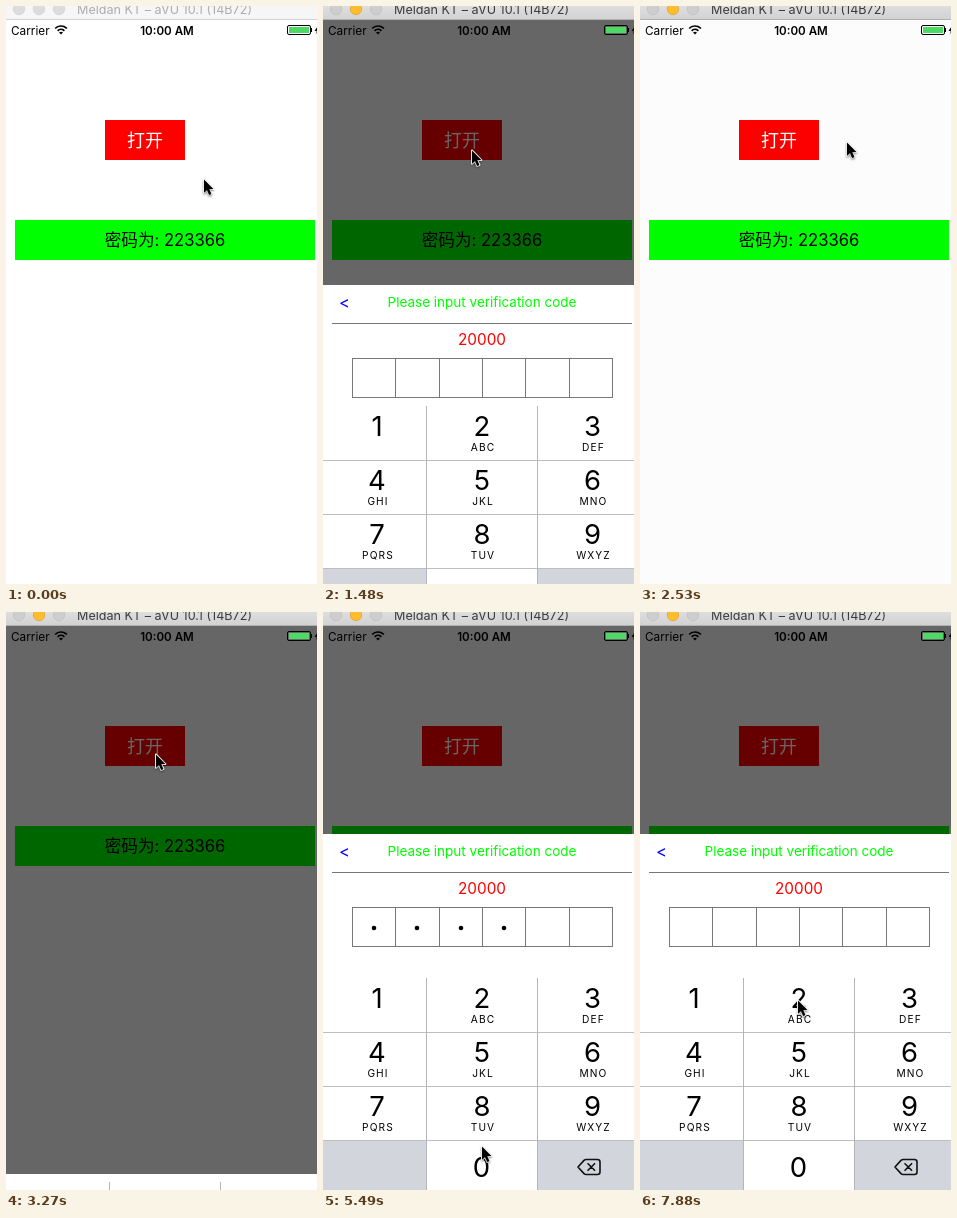
An HTML page with a canvas for the animation above (8000 ms loop, 311 px wide and 578 px high).

```html
<!DOCTYPE html>
<html lang="en">
<head>
<meta charset="utf-8">
<title>Verification code sheet</title>
<style>
  html, body { margin: 0; width: 311px; height: 578px; overflow: hidden; background: #fff; }
  canvas { display: block; }
</style>
</head>
<body>
<canvas id="stage" width="311" height="578"></canvas>
<script>
const ctx = document.getElementById('stage').getContext('2d');
const LOOP = 8000, TICK = 148.5;   // the screen refreshes once per tick
const FONT = "Inter, 'Noto Sans CJK SC', 'Noto Sans CJK', sans-serif";
const KEYS = ['', 'ABC', 'DEF', 'GHI', 'JKL', 'MNO', 'PQRS', 'TUV', 'WXYZ'];
const COLS = [0, 104, 215, 326], CENTERS = [54, 159, 269.5], ROW = 54;
const KEY_GREY = '#d2d5db';

// Pointer path: tick, x, y
const POINTER = [
  [1, 197, 172], [3, 178, 160], [5, 151, 145], [7, 148, 143], [10, 148, 143],
  [13, 206, 135], [18, 206, 135], [21, 149, 141], [23, 149, 141], [26, 143, 425],
  [28, 145, 443], [31, 147, 446], [32, 147, 446], [34, 151, 497], [36, 150, 505],
  [37, 158, 533], [38, 175, 519], [39, 175, 519], [41, 237, 499], [45, 235, 497],
  [48, 235, 497], [52, 159, 390], [53, 157, 387]
];
// Key presses: tick of press, key number
const PRESSES = [[29, 5], [30, 5], [34, 8], [36, 8], [41, 9], [43, 9]];

function rect(x, y, w, h, color) {
  ctx.fillStyle = color;
  ctx.fillRect(x, y, w, h);
}

function text(str, x, y, size, color, { weight = 400, align = 'center', spacing = 0 } = {}) {
  ctx.font = `${weight} ${size}px ${FONT}`;
  ctx.letterSpacing = spacing + 'px';
  ctx.textAlign = align;
  ctx.fillStyle = color;
  ctx.fillText(str, x, y);
}

function shape(path, x, y, { fill, stroke, width = 1 }) {
  ctx.save();
  ctx.translate(x, y);
  const p = new Path2D(path);
  ctx.lineWidth = width;
  ctx.lineJoin = ctx.lineCap = 'round';
  if (stroke) { ctx.strokeStyle = stroke; ctx.stroke(p); }
  if (fill) { ctx.fillStyle = fill; ctx.fill(p); }
  ctx.restore();
}

function titleBar(active) {
  const g = ctx.createLinearGradient(0, 0, 0, 13);
  g.addColorStop(0, active ? '#dedede' : '#f6f6f6');
  g.addColorStop(1, active ? '#d2d2d2' : '#f6f6f6');
  rect(0, 0, 311, 13, g);
  rect(0, 13, 311, 1, active ? '#b0b0b0' : '#d3d3d3');
  [13, 33, 53].forEach((x, i) => {
    const lit = active && i === 1;
    ctx.beginPath();
    ctx.arc(x, 3, 5.7, 0, 7);
    ctx.fillStyle = lit ? '#ffbd2e' : active ? '#cecece' : '#dcdcdc';
    ctx.strokeStyle = lit ? '#e0a028' : active ? '#bcbcbc' : '#d0d0d0';
    ctx.lineWidth = 0.7;
    ctx.fill();
    ctx.stroke();
  });
  text('Meldan KT – aVU 10.1 (14B72)', 158.5, 8, 12.6, active ? '#3c3c3c' : '#adadad');
}

function statusBar() {
  text('Carrier', 5, 28.5, 11.8, '#000', { align: 'left' });
  text('10:00 AM', 161, 28.5, 11.6, '#000', { weight: 600 });
  ctx.strokeStyle = '#000';
  ctx.lineWidth = 1.7;
  [4.6, 8].forEach(r => {
    ctx.beginPath();
    ctx.arc(55, 28, r, -Math.PI * 0.76, -Math.PI * 0.24);
    ctx.stroke();
  });
  shape('M0 0L-2 -2Q0 -3.6 2 -2Z', 55, 28.5, { fill: '#000' });
  ctx.lineWidth = 1;
  ctx.beginPath();
  ctx.roundRect(281.5, 19.5, 23, 9, 1.5);
  ctx.stroke();
  rect(283, 21, 20, 6, '#4cd964');
  rect(305, 22, 1, 4, '#000');
  shape('M4 -5L0 1H3L1 5Z', 308.5, 24, { fill: '#000' });
}

function page(dim) {
  rect(0, 14, 311, 564, '#fff');
  rect(99, 114, 80, 40, '#f00');
  text('打开', 139, 140.5, 18, '#fff');
  rect(9, 214, 300, 40, '#0f0');
  text('密码为: 223366', 159, 240, 16.6, '#000');
  rect(0, 14, 311, 564, `rgba(0,0,0,${dim})`);
}

function keyboard(top, pressed) {
  rect(0, top, 311, 216, '#fff');
  rect(0, top + 3 * ROW, 103, ROW, KEY_GREY);
  rect(215, top + 3 * ROW, 96, ROW, KEY_GREY);
  KEYS.forEach((letters, i) => {
    const col = i % 3, y = top + Math.floor(i / 3) * ROW;
    if (pressed === i + 1) rect(COLS[col], y, COLS[col + 1] - COLS[col] - 1, ROW, KEY_GREY);
    text(i + 1, CENTERS[col], y + 30, 27.5, '#000');
    text(letters, CENTERS[col] + 1, y + 45, 10.2, '#000', { spacing: 1.1 });
  });
  text('0', 158.5, top + 199, 27.5, '#000');
  [1, 2, 3].forEach(r => rect(0, top + r * ROW, 311, 1, '#bcbec2'));
  [103, 214].forEach(x => rect(x, top, 1, 216, '#b3b5b9'));
  shape('M-11 0L-5 -6.6Q-4 -7.5 -3 -7.5H8.5Q11 -7.5 11 -5V5Q11 7.5 8.5 7.5H-3Q-4 7.5 -5 6.6Z' +
    'M-1 -3.3L5.6 3.3M5.6 -3.3L-1 3.3', 266, top + 189, { stroke: '#111', width: 1.6 });
}

function sheet(hidden, dots, shift, pressed) {
  const y = Math.round(222 + 360 * hidden);
  rect(0, y, 311, 360, '#fff');
  text('<', 16, y + 22.5, 16.4, '#00f', { align: 'left' });
  text('Please input verification code', 159, y + 22, 13.5, '#0f0');
  rect(9, y + 38, 300, 1, '#777');
  text('20000', 159, y + 60, 15.3, '#f00');
  const x = i => Math.floor(29.4 + shift + i * 260 / 6);
  for (let i = 0; i < 7; i++) rect(x(i), y + 73, 1, 40, '#777');
  rect(x(0), y + 73, 260, 1, '#777');
  rect(x(0), y + 112, 260, 1, '#777');
  for (let i = 0; i < dots; i++) {
    ctx.beginPath();
    ctx.arc(x(i) + 22, y + 94, 2.3, 0, 7);
    ctx.fillStyle = '#000';
    ctx.fill();
  }
  keyboard(Math.round(366 + 216 * hidden), pressed);
}

function pointer(k) {
  const n = POINTER.findIndex(p => p[0] >= k);
  const [k1, x1, y1] = POINTER[Math.max(n, 0)];
  const [k0, x0, y0] = POINTER[Math.max(n - 1, 0)];
  const u = k1 > k0 ? (k - k0) / (k1 - k0) : 0;
  ctx.save();
  ctx.shadowColor = 'rgba(0,0,0,.35)';
  ctx.shadowBlur = 2;
  ctx.shadowOffsetY = 1;
  shape('M0 0V13.2L3 10.4L5.2 15.4L7.4 14.5L5.2 9.6H9.4Z',
    Math.round(x0 + (x1 - x0) * u) + 1, Math.round(y0 + (y1 - y0) * u) + 1.5,
    { fill: '#000', stroke: '#fff', width: 2 });
  ctx.restore();
}

// Critically damped spring: share of the way still to go
function spring(ticks) {
  const w = 2.92 * (ticks + 0.128);
  return (1 + w) * Math.exp(-w);
}

function draw(k) {
  const opened = k >= 22 ? 22 : k >= 9 && k < 17 ? 9 : 0;
  const press = PRESSES.find(p => p[0] === k);
  const dots = k < 45 ? PRESSES.filter(p => p[0] <= k).length : 0;
  const shift = k >= 45 && k < 48 ? 4.4 : 0;
  page(opened ? 0.6 : k === 17 || k === 18 ? 0.012 : 0);
  titleBar(k >= 6);
  statusBar();
  if (opened) sheet(spring(k - opened), dots, shift, press && press[1]);
  pointer(Math.max(k, 1));
}

function frame(now) {
  draw(Math.min(53, Math.floor((now % LOOP) / TICK + 0.1)));
  requestAnimationFrame(frame);
}
requestAnimationFrame(frame);
</script>
</body>
</html>
```
